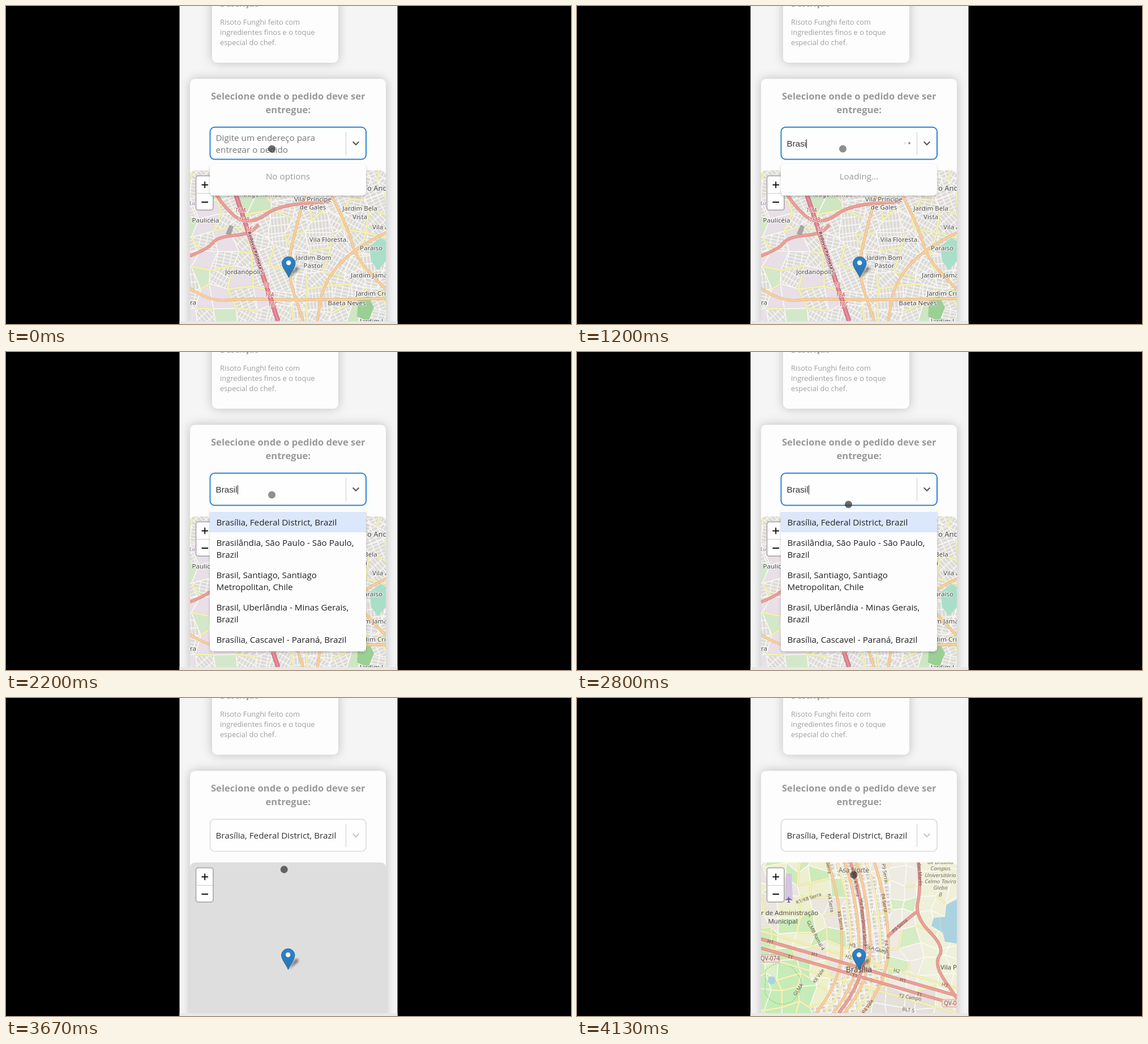
Recreate the animation shown at these times as an HTML page. Size 998 by 561 pixels, loop 4.16 s.

```html
<!DOCTYPE html>
<html lang="pt-BR">
<head>
<meta charset="utf-8">
<title>Entrega</title>
<style>
html, body { margin: 0; width: 100%; height: 100%; overflow: hidden; background: #000; }
svg { display: block; }
text { font-family: "Open Sans", "Noto Sans", sans-serif; }
.map text { font-family: "Noto Sans", "Open Sans", sans-serif; paint-order: stroke; stroke: #fffc; stroke-width: 2px; stroke-linejoin: round; }
.card { fill: #fdfdfd; filter: drop-shadow(0 0 9px rgba(0,0,0,.22)); }
.menu { fill: #fdfdfd; filter: drop-shadow(0 2px 2px rgba(0,0,0,.22)); }
.ui { font-size: 15.24px; }
.mid { text-anchor: middle; }
.soft { font-size: 12.86px; fill: #9f9f9f; }
.head { font-size: 16.57px; font-weight: 700; fill: #999; text-anchor: middle; }
.typed { font: 15.24px "Liberation Sans", Arial, sans-serif; fill: #333; }
</style>
</head>
<body>
<svg width="998" height="561" viewBox="0 0 998 561">
  <defs id="defs">
    <clipPath id="page"><rect x="306" width="386" height="561"/></clipPath>
    <clipPath id="frame"><path d="M325 556V300q0-10 10-10H661q10 0 10 10V556Z"/></clipPath>
    <clipPath id="field"><rect x="362" y="216" width="236" height="43"/></clipPath>
    <clipPath id="tile0"><rect x="325" y="290" width="73.500" height="266"/></clipPath>
    <clipPath id="tile1"><rect x="398.500" y="290" width="243" height="266"/></clipPath>
    <clipPath id="tile2"><rect x="641.500" y="290" width="30" height="266"/></clipPath>
    <linearGradient id="pinFill" x2="0" y2="1"><stop stop-color="#2e83c8"/><stop offset="1" stop-color="#2975b0"/></linearGradient>
    <filter id="blur"><feGaussianBlur stdDeviation="2"/></filter>
    <pattern id="lots" width="10" height="13" patternUnits="userSpaceOnUse" patternTransform="rotate(-8)">
      <rect width="10" height="13" fill="#ebe7e0"/>
      <path d="M2 3.500H7M3 9.500H7" stroke="#d3ccc4" stroke-width="3"/><path d="M0 .5H10M.5 0V13" stroke="#fff"/>
    </pattern>
  </defs>
  <rect width="998" height="561"/>
  <g clip-path="url(#page)">
    <rect x="306.500" width="385" height="561" fill="#f5f5f6"/>
    <rect class="card" x="364" y="-60" width="223" height="160" rx="9"/>
    <text x="378" y="1" font-size="14.300" font-weight="700" fill="#999">Descrição</text>
    <text class="soft" x="378" y="32.500">Risoto Funghi feito com</text>
    <text class="soft" x="378" y="50.500">ingredientes finos e o toque</text>
    <text class="soft" x="378" y="68.500">especial do chef.</text>
    <rect class="card" x="325" y="128.500" width="346" height="480" rx="9"/>
    <text class="head" x="498.300" y="165">Selecione onde o pedido deve ser</text>
    <text class="head" x="498.300" y="189">entregue:</text>

    <g clip-path="url(#frame)" class="map">
      <rect x="325" y="290" width="346" height="266" fill="#dedede"/>
      <g id="before"></g>
      <g id="after"></g>
    </g>
    <g id="pin">
      <path d="M499 479L512 461Q520 458 516 466Z" fill="#0008" filter="url(#blur)"/>
      <path d="M499.500 479C496 470 487.500 462 487.500 453A11.800 11.800 0 0 1 511 453C511 462 503 470 499.500 479Z" fill="url(#pinFill)" stroke="#2b6c9f"/>
      <circle cx="499.200" cy="453" r="4.200" fill="#fff"/>
    </g>
    <rect x="335.500" y="299.500" width="30.500" height="60.500" rx="4" fill="#fff" stroke="#b5b2b2" stroke-width="2"/>
    <path d="M336 330.500H365" stroke="#ccc"/>
    <path d="M345.500 315.500H357M351.200 309.700V321.300M345.500 346H357" stroke="#111" stroke-width="1.900"/>
    <rect x="306.500" y="556" width="385" height="5" fill="#e8e8e9"/>

    <rect id="box" x="360.500" y="213.800" width="275.500" height="56.700" rx="8" fill="#fefefe"/>
    <path d="M600.500 222V263" stroke="#ccc"/>
    <path id="arrow" d="M613.300 240L618 244.700L622.700 240" fill="none" stroke-width="2.200" stroke-linecap="round"/>
    <g id="hint" class="ui" fill="#777" clip-path="url(#field)">
      <text x="370.500" y="237.500">Digite um endereço para</text>
      <text x="370.500" y="258.500">entregar o pedido</text>
    </g>
    <g id="typing">
      <text id="typed" class="typed" x="370.500" y="248"></text>
      <path id="caret" d="M0 235V251" stroke="#222"/>
    </g>
    <g id="dots" fill="#666">
      <circle cx="571.800" cy="242" r="1.900"/><circle cx="579.400" cy="242" r="1.900"/><circle cx="587" cy="242" r="1.900"/>
    </g>
    <text id="value" class="ui" x="370.500" y="248" fill="#333">Brasília, Federal District, Brazil</text>

    <g id="notice">
      <rect class="menu" x="360" y="278" width="276" height="56.500" rx="7"/>
      <text id="noticeText" class="ui mid" x="498" y="305.500" fill="#999"></text>
    </g>
    <g id="options">
      <rect class="menu" x="360" y="278" width="276" height="250" rx="5"/>
      <rect x="360" y="282" width="276" height="36" fill="#dbe7fb"/>
    </g>
    <circle id="cursor" r="6.500"/>
  </g>
</svg>

<script>
const $ = id => document.getElementById(id);
const LEFT = 325, TOP = 290, RIGHT = 671, BOTTOM = 556;

function random(seed) {
  return () => (seed = (seed * 16807) % 2147483647) / 2147483647;
}

// Smooth line through the midpoints of a few points
function curve(s) {
  const p = s.split(' ').map(q => q.split(',').map(Number));
  let d = `M${p[0]}`;
  for (let i = 1; i < p.length - 1; i++) {
    d += `Q${p[i]} ${(p[i][0] + p[i + 1][0]) / 2},${(p[i][1] + p[i + 1][1]) / 2}`;
  }
  return d + `L${p[p.length - 1]}`;
}

// Line x(y) over the height of the map, or y(x) over its width
function down(x) {
  let d = '';
  for (let y = TOP; y <= BOTTOM; y += 14) d += `${d ? 'L' : 'M'}${x(y).toFixed(1)},${y}`;
  return d;
}
const across = y => `M${LEFT},${y(LEFT)}L${RIGHT},${y(RIGHT)}`;

const stroke = (d, color, width) =>
  `<path d="${d}" fill="none" stroke="${color}" stroke-width="${width}" stroke-linejoin="round"/>`;

const KINDS = {
  yellow: ['#f5f3b4', '#dcd8ac', 2.6],
  orange: ['#f8cf9c', '#dfb07c', 3.6],
  red: ['#ea9f95', '#cf8179', 4.4],
  motorway: ['#df7f8c', '#b8536a', 6.5],
};

function roads(kind, ...paths) {
  const [fill, edge, width] = KINDS[kind], d = paths.join('');
  return stroke(d, edge, width + 1.2) + stroke(d, fill, width);
}

const area = (color, s) => `<polygon points="${s}" fill="${color}"/>`;

function label(str, x, y, o = {}) {
  const { size = 11.5, fill = '#444', rot = 0, anchor = 'middle', style = 'normal', weight = 400 } = o;
  return `<text x="${x}" y="${y}" font-size="${size}" fill="${fill}" text-anchor="${anchor}" ` +
    `font-style="${style}" font-weight="${weight}" transform="rotate(${rot} ${x} ${y})">${str}</text>`;
}
const labels = (list, o) => list.map(([s, x, y]) => label(s, x, y, o)).join('');

// Street textures in five directions
for (let i = 0; i < 5; i++) {
  $('defs').insertAdjacentHTML('beforeend',
    `<pattern id="grid${i}" width="${10 + i}" height="6" patternUnits="userSpaceOnUse" patternTransform="rotate(${i * 36 - 60})">
      <rect width="20" height="6" fill="#dcdad6"/><path d="M0 1H20M1 0V6" stroke="#f8f7f3" stroke-width="1.700"/></pattern>`);
}

// Jittered mesh of districts; paint() fills a cell, busy() is the chance of a main street along its side
function mesh(step, seed, paint, busy) {
  const rnd = random(seed), cols = Math.ceil((RIGHT - LEFT) / step) + 2, rows = Math.ceil((BOTTOM - TOP) / step) + 2;
  const node = Array.from({ length: rows + 1 }, (_, r) => Array.from({ length: cols + 1 }, (_, c) =>
    [LEFT + (c - 1 + rnd() * .7) * step, TOP + (r - 1 + rnd() * .7) * step].map(v => v.toFixed(1))));
  let cells = '', streets = '';
  for (let r = 0; r < rows; r++) for (let c = 0; c < cols; c++) {
    const x = LEFT + (c - .2) * step, y = TOP + (r - .2) * step, a = node[r][c];
    cells += `<polygon points="${[a, node[r][c + 1], node[r + 1][c + 1], node[r + 1][c]].join(' ')}" ` +
      `fill="${paint(x, y, rnd())}" stroke="#faf9f5" stroke-width="1.500"/>`;
    for (const b of [node[r][c + 1], node[r + 1][c]]) if (rnd() < busy(x, y)) streets += `M${a}L${b}`;
  }
  return cells + roads('yellow', streets);
}

function firstMap() {
  const highway = y => 407 + (y - 336) * .335;
  const exit = { size: 10, fill: '#c0423f', style: 'italic' };
  const brand = { size: 9.5, fill: '#8a6a98', style: 'italic', anchor: 'start' };
  const grid = r => `url(#grid${Math.floor(r * 97) % 5})`;
  const paint = (x, y, r) => x < highway(y) - 12
    ? (r < .42 ? '#e8dfe7' : r < .52 ? '#d3e8c8' : grid(r))
    : (r < .05 ? '#cfe6c3' : grid(r));

  return mesh(33, 77, paint, () => .32) +
    area('#a9dfc8', '642,424 661,409 671,414 671,450 657,466 645,450') +
    area('#9bcf95', '622,517 640,512 650,532 640,556 620,548') +
    area('#a8a4a4', '388,402 395,386 402,389 397,405') +
    roads('orange', curve('325,498 360,522 420,516 525,519 671,516'), curve('528,335 508,405 496,470 525,556'),
      curve('575,335 604,390 618,445 671,500'), curve('671,400 610,430 560,490 550,556')) +
    roads('red', curve('325,441 358,428 372,408 430,402 446,386'), curve('366,325 399,375 440,382 480,352 570,345')) +
    roads('motorway', down(highway)) + stroke(down(highway), '#eda8b0', 1) +
    label('Rodovia Palmeta', highway(432) - 2, 432, { size: 8.3, rot: 72, fill: '#70293a', weight: 700 }) +
    labels([['16 A', 414, 364], ['16 B', 420, 381], ['16', 430, 397], ['18', 460, 496], ['18A', 465, 513], ['18C', 471, 530]], exit) +
    labels([['Lu', 324, 351], ['tork', 335, 360]], brand) +
    labels([['Rudge Ramos', 449, 336], ['Paulicéia', 352.5, 382], ['Vila Príncipe', 542, 345], ['de Gales', 542, 359],
      ['Jardim Bela', 625, 361], ['Vista', 625, 376], ['Vila Floresta.', 570, 416], ['Paraíso', 645, 431],
      ['Jardim Bom', 543, 447.5], ['Pastor', 543, 462], ['Jordanópolis', 421, 473], ['Baeta Neves', 602, 528]]) +
    labels([['Vila Alice', 647, 394], ['Jardim Jamaica', 609, 479], ['Jardim Cristina', 618, 511],
      ['Jardim Lavínia', 625, 560], ['ra', 325, 527]], { anchor: 'start' }) +
    label('o André', 638, 326, { size: 13, anchor: 'start' });
}

function secondMap() {
  // A bending avenue and a straight one; other streets run parallel to them
  const avenue = y => 508 - (y < 440 ? .0011 : .0034) * (y - 440) ** 2;
  const mall = x => 425 + (x - LEFT) * .29;
  const small = { size: 8.5, fill: '#59504a' };
  const along = (str, off, y, rot = 80) => label(str, (avenue(y) + off - 3).toFixed(1), y, { ...small, rot });
  const aside = (str, off, x) => label(str, x, mall(x) + off + 3, { ...small, rot: 15 });
  const shield = (str, x, y) => `<rect x="${x}" y="${y - 10}" width="37" height="13" rx="2" fill="#f7dfd7" stroke="#c9a294"/>` +
    label(str, x + 3, y, { size: 10, anchor: 'start', fill: '#725249' });

  const paint = (x, y, r) => {
    const off = x - avenue(y), south = y > mall(x) + 16;
    if (south && x < 410) return r < .7 ? '#c5ecb8' : '#dcefc6';
    if (Math.abs(off) < 42) return 'url(#lots)';
    if (south) return off < 0 ? (r < .5 ? 'url(#lots)' : '#eef0cd') : (r < .5 ? '#ebe6df' : '#e4e0da');
    if (off < 0) return r < .35 ? '#cdebb9' : r < .75 ? '#eeefcf' : '#ebe5df';
    if (x > 612) return '#eff0da';
    return r < .3 ? '#d5ecc4' : '#eeebe2';
  };
  const busy = (x, y) => x < avenue(y) - 40 ? .4 : .1;

  let marks = '';
  for (let i = 0; i < 4; i++) marks += aside('H1', 0, 341 + i * 78);
  for (let i = 0; i < 3; i++) marks += aside('T1', 17, 376 + i * 114) + aside('H2', -13, 479 + i * 85);

  return `<rect x="325" y="290" width="346" height="266" fill="#eee9e1"/>` + mesh(27, 41, paint, busy) +
    area('#aad3df', '671,355 652,365 650,386 630,388 626,402 646,414 650,430 671,433') +
    `<circle cx="344" cy="498" r="7" fill="#aad3df"/><path d="M369 310H379L381 356H367Z" fill="#d5c5e0"/>` +
    stroke('M333 480Q366 452 390 488Q407 510 380 535Q350 550 332 520Z', '#7cc08a', '1.2" stroke-dasharray="2 2') +
    roads('yellow', down(y => avenue(y) - 24), down(y => avenue(y) + 28), across(x => mall(x) - 14), across(x => mall(x) + 31)) +
    roads('orange', down(y => avenue(y) - 40), down(y => avenue(y) - 10), down(y => avenue(y) + 10), down(y => avenue(y) + 42)) +
    roads('red', down(avenue), across(mall), across(x => mall(x) + 16),
      curve('603,290 608,335 596,385 650,440 630,470 671,530'), curve('599,378 565,405 548,422')) +
    `<path d="M374 349l1 4 5 3v1l-5-1v3l2 2h-6l2-2v-3l-5 1v-1l5-3z" fill="#7757c2"/>` +
    along('K9 Serra', -41, 294) + along('K4 Serra', -53, 362) + along('K6 Serra', -40, 393) +
    along('Via K Serra', -2, 330) + along('Via Panorâmica Serra', 0, 396, 85) +
    along('P9 Serra', 55, 309) + along('P4 Serra', 42, 362) + along('P4 Serra', 40, 444) + marks +
    label('K1/K8 Serra', 410, 356, { ...small, rot: -19 }) + label('P9 Serra', 572, 404, { ...small, rot: -40 }) +
    label('GLMB Ramal 4', 419, 420, { ...small, rot: 62 }) + label('GLA:GMN', 527, 446, { ...small, rot: 17 }) +
    label('das Marés', 603, 311, { ...small, rot: 86 }) +
    labels([['H3', 486, 439], ['T2 Campo', 588, 531], ['BLT 5', 585, 553]], { ...small, rot: 9 }) +
    labels([['GLMA', 393, 516], ['K8 Vale', 429, 492], ['P4 Vale', 516, 546]], { ...small, rot: -55 }) +
    shield('QV-074', 321, 463) + shield('QV-052', 645, 542) +
    ['de Brasília', 'Campus', 'Universitário', 'Celmo Tavira', 'Gleba', 'B'].map((s, i) =>
      label(s, 642, 293 + i * 11.3, { size: 9.8, fill: '#706a58', style: 'italic' })).join('') +
    label('Asa Norte', 489, 308, { size: 11.7, fill: '#666' }) + label('Municipal', 363.5, 397.5) +
    label('Brasília', 498, 484, { size: 13.6 }) +
    labels([['r de Administração', 325, 383], ['Vila Planalto', 642, 479]], { anchor: 'start' });
}

$('before').innerHTML = firstMap();
$('defs').insertAdjacentHTML('beforeend', `<g id="city">${secondMap()}</g>`);
$('after').innerHTML = [0, 1, 2].map(i => `<use href="#city" clip-path="url(#tile${i})"/>`).join('');

const choices = ['Brasília, Federal District, Brazil', 'Brasilândia, São Paulo - São Paulo,|Brazil',
  'Brasil, Santiago, Santiago|Metropolitan, Chile', 'Brasil, Uberlândia - Minas Gerais,|Brazil',
  'Brasília, Cascavel - Paraná, Brazil'];
let rowTop = 282;
for (const choice of choices) {
  const rows = choice.split('|');
  $('options').insertAdjacentHTML('beforeend', rows.map((s, i) =>
    `<text class="ui" x="371.500" y="${rowTop + 23.5 + i * 21}" fill="#222">${s}</text>`).join(''));
  rowTop += 15 + rows.length * 21;
}

const LOOP = 4160, TYPING = 400, KEY_GAP = 130, LAST_KEY = 1300, LISTED = 1470, MOVED = 2800, CHOSEN = 3660;
const tileStart = [3855, 3715, 3770];

const clamp = v => Math.max(0, Math.min(1, v));
const show = (id, on) => $(id).setAttribute('display', on ? 'inline' : 'none');

function typedCount(t) {
  if (t < TYPING) return 0;
  return t < LAST_KEY ? Math.min(5, 1 + Math.floor((t - TYPING) / KEY_GAP)) : 6;
}

function cursorAt(t) {
  if (t < MOVED) return [469.5, 252];
  const a = clamp((t - 2900) / 300), b = clamp((t - 3600) / 270), c = clamp((t - 3870) / 260);
  return [479.5 + 11.5 * a + b - 3 * c, 269 + 33 * a + 2 * b + 8 * c];
}

// Dot opacity rises to 1 at 40 % and is gone by 80 % of each second
function pulse(ms) {
  const p = (ms + 1000) % 1000 / 400;
  const k = p < 1 ? p : Math.max(0, 2 - p);
  return k * k * (3 - 2 * k);
}

function draw(t) {
  const count = typedCount(t);
  const chosen = t >= CHOSEN, loading = count > 0 && t < LISTED;

  show('hint', !count);
  show('typing', count && !chosen);
  $('typed').textContent = 'Brasil'.slice(0, count);
  if (count && !chosen) $('caret').setAttribute('transform', `translate(${Math.round(370.5 + $('typed').getComputedTextLength()) + .5})`);
  show('dots', loading);
  [...$('dots').children].forEach((dot, i) => dot.setAttribute('opacity', pulse(t - 350 - i * 160)));
  show('value', chosen);
  show('notice', t < LISTED);
  $('noticeText').textContent = loading ? 'Loading...' : 'No options';
  show('options', t >= LISTED && !chosen);

  $('box').setAttribute('stroke', chosen ? '#d2cfca' : '#2c83d8');
  $('box').setAttribute('stroke-width', chosen ? 1.2 : 2);
  $('arrow').setAttribute('stroke', chosen ? '#c5c5c5' : '#5c5a55');

  show('before', !chosen);
  show('after', chosen);
  [...$('after').children].forEach((tile, i) => tile.setAttribute('opacity', clamp((t - tileStart[i]) / 200)));
  $('pin').setAttribute('transform', `translate(${chosen ? -1 : 0})`);

  const [x, y] = cursorAt(t);
  $('cursor').setAttribute('cx', x);
  $('cursor').setAttribute('cy', y);
  $('cursor').setAttribute('fill', t < 230 || t >= MOVED ? 'rgba(45,45,42,.7)' : 'rgba(60,60,50,.57)');
}

function tick() {
  draw(performance.now() % LOOP);
  requestAnimationFrame(tick);
}
tick();
</script>
</body>
</html>
```
